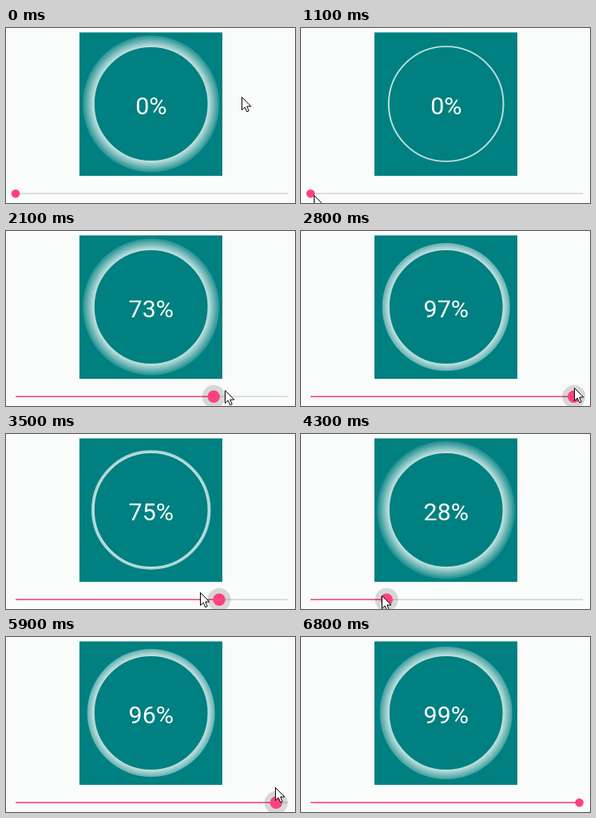
An HTML page for the animation above (6900 ms loop, 362 by 219 pixels).

```html
<!DOCTYPE html>
<html lang="en">
<head>
<meta charset="utf-8">
<title>Pulsing progress ring</title>
<style>
  html, body { margin: 0; width: 100%; height: 100%; overflow: hidden; background: #f9fcfb; }
  svg { display: block; }
  text { font: 30.4px Roboto, sans-serif; fill: #fff; text-anchor: middle; }
</style>
</head>
<body>
<svg width="362" height="219" viewBox="0 0 362 219">
  <defs>
    <radialGradient id="glow" gradientUnits="userSpaceOnUse" cx="181.7" cy="95" r="88">
      <stop offset=".805" stop-color="#fff" stop-opacity=".79"/>
      <stop offset="1" stop-color="#fff" stop-opacity=".03"/>
    </radialGradient>
  </defs>
  <rect x="92" y="5.5" width="179" height="179.5" fill="#008080"/>
  <circle id="ring" cx="181.7" cy="95" fill="none" stroke="url(#glow)"/>
  <text id="label" x="181.8" y="107.6"></text>
  <path d="M12 207.2H353" stroke="#d3d4d4" stroke-width="1.5"/>
  <path id="progress" stroke="#ff4081" stroke-width="1.5"/>
  <circle id="halo" cy="207.2" r="14.5" fill="#000" fill-opacity=".14"/>
  <circle id="thumb" cy="207.2" fill="#ff4081"/>
  <path id="cursor" d="M.5 .5V16.6L4.2 13.1L6.7 18.8L9.2 17.7L6.8 12.1H11.8Z" fill="#fff" stroke="#000"/>
</svg>
<script>
  const LOOP = 6900, STEP = 100, PULSE = 2100, PEAK = 150;
  const INNER = 70.9, GLOW = 16;
  const APPROACH = 800, PRESS = 1180, LEAVE = 6400, RELEASE = 6500;

  const swing = u => (1 - Math.cos(Math.PI * u)) / 2;
  const easeOut = power => u => 1 - (1 - u) ** power;
  const mix = (a, b, u) => a + (b - a) * u;
  const clamp = u => Math.min(1, Math.max(0, u));

  // Each drag moves the slider between two percentages; the cursor runs ahead by `lead`.
  const drags = [
    { start: PRESS, end: 2600, from: 0, to: 97, y0: 209, y1: 195.5, lead: .12, ease: easeOut(1.35) },
    { start: 2830, end: 4740, from: 97, to: 18, y0: 195.5, y1: 203, lead: .1, ease: swing },
    { start: 4560, end: 6250, from: 18, to: 99, y0: 203, y1: 187, lead: .03, ease: easeOut(2) }
  ];

  const [ring, label, progress, halo, thumb, cursor] =
    ['ring', 'label', 'progress', 'halo', 'thumb', 'cursor'].map(id => document.getElementById(id));

  const trackX = percent => 12 + 3.4 * percent;

  function set(node, attrs) {
    for (const name in attrs) node.setAttribute(name, attrs[name]);
  }

  // Glow thickness falls and rises symmetrically around its peak.
  function ringWidth(t) {
    const phase = (t - PEAK + PULSE) % PULSE;
    const x = Math.min(phase, PULSE - phase) / (PULSE / 2);
    return Math.max(1.2, GLOW * (1 - x ** 1.3));
  }

  function dragState(t) {
    const drag = drags.filter(d => d.start <= t).pop() || drags[0];
    const u = clamp((t - drag.start) / (drag.end - drag.start));
    const ahead = drag.ease(mix(u, 1, drag.lead));
    return {
      percent: Math.round(mix(drag.from, drag.to, drag.ease(u))),
      x: trackX(mix(drag.from, drag.to, ahead)),
      y: mix(drag.y0, drag.y1, drag.ease(u))
    };
  }

  function cursorAt(t, drag) {
    if (t < PRESS) {
      const u = swing(clamp(t / APPROACH));
      return [mix(295, 16, u), mix(86, 209, u)];
    }
    return [drag.x + Math.max(0, t - LEAVE) * .08, drag.y];
  }

  function draw(t) {
    const width = ringWidth(t);
    set(ring, { r: INNER + width / 2, 'stroke-width': width });

    const drag = dragState(t);
    const x = trackX(drag.percent);
    const pressed = t >= PRESS && t < RELEASE;
    label.textContent = drag.percent + '%';
    set(progress, { d: `M12 207.2H${x}` });
    set(halo, { cx: x, visibility: pressed ? 'visible' : 'hidden' });
    set(thumb, { cx: x, r: pressed ? 7.8 : 5.3 });
    set(cursor, { transform: `translate(${cursorAt(t, drag).map(Math.round)})` });
  }

  const start = performance.now();
  function tick() {
    const t = (performance.now() - start) % LOOP;
    draw(Math.floor(t / STEP) * STEP);
    requestAnimationFrame(tick);
  }
  draw(0);
  requestAnimationFrame(tick);
</script>
</body>
</html>
```
